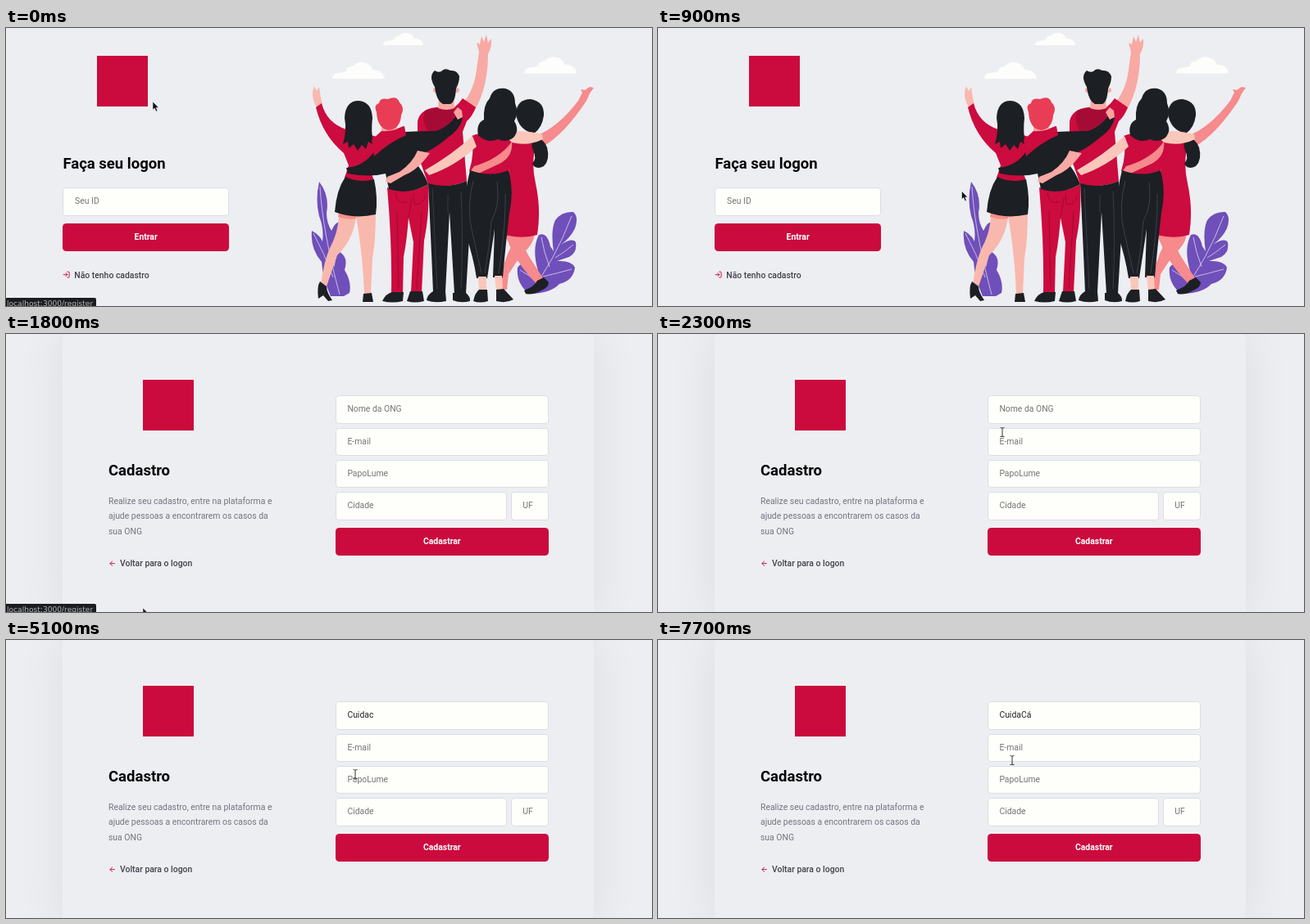
These frames come from a looping animation (788x340 px, 8000 ms). An HTML page:

```html
<!DOCTYPE html>
<html lang="pt-BR">
<head>
<meta charset="utf-8">
<title>Cadastro</title>
<style>
  html, body { margin: 0; width: 100%; height: 100%; overflow: hidden; }
  body { position: relative; background: #edeef2; font: 400 10.4px/1 Roboto, sans-serif; color: #737380; }
  .page, .page > *, #status, #pointer { position: absolute; box-sizing: border-box; white-space: nowrap; }
  .page { inset: 0; overflow: hidden; }
  .card { left: 69px; top: 0; width: 648px; height: 346px; border-radius: 4.6px; box-shadow: 0 0 58px rgba(0, 0, 0, .075); }
  .brand { width: 62px; height: 62px; background: #cb0b3d; }
  h1 { margin: 0; font-size: 18.5px; line-height: 20px; font-weight: 700; color: #060609; }
  .field, .button { height: 34.6px; border-radius: 4.6px; display: flex; align-items: center; }
  .field { padding-left: 13.7px; border: .6px solid #dcdce6; background: #fefefb; color: #757575; }
  .button { justify-content: center; background: #cb0b3d; color: #fff; font-weight: 700; }
  .link { line-height: 14px; font-weight: 500; color: #41414d; }
  .icon { width: 9.3px; height: 9.3px; fill: none; stroke: #cb0b3d; stroke-width: 2.4; stroke-linecap: round; stroke-linejoin: round; }
  .text { line-height: 18.5px; }
  .typed { color: #222; }
  .caret { position: relative; width: 0; height: 12px; }
  .caret::after { content: ""; position: absolute; left: -.2px; width: 1px; height: 12px; background: #222; }
  #status { left: 0; top: 330px; width: 110px; height: 10px; padding-left: 1px; overflow: hidden; border-radius: 0 2px 0 0;
    background: #1b1d20; color: #b6b7b9; font: 9.1px/14px "DejaVu Sans", sans-serif; }
  #art { left: 0; top: 0; }
  #pointer { left: 0; top: 0; overflow: visible; }
  [hidden] { display: none !important; }
</style>
</head>
<body>

<div class="page" id="login">
  <svg id="art" width="788" height="340" viewBox="0 0 788 340">
    <defs>
      <path id="cloud" d="M0 20Q0 13 8 13Q14 12 17 11Q18 4 25 5Q30-1 38 0Q48 2 49 9Q62 9 64 20Z"/>
    </defs>
    <g fill="#fdfdfb">
      <use href="#cloud" transform="translate(460 6) scale(.77 .75)"/>
      <use href="#cloud" x="398" y="42"/>
      <use href="#cloud" x="632" y="35.5"/>
    </g>

    <!-- plants -->
    <g fill="#6f4fb9">
      <path d="M382 188Q395 205 391 226Q391 238 397 248Q404 232 412 240Q414 254 407 274Q418 280 413 296Q422 311 419 324L412 328H396Q386 305 385 286Q371 270 373 248Q382 252 386 261Q388 245 382 230Q377 210 382 188Z"/>
      <path d="M638 325Q622 312 624 293Q632 282 643 293L649 297Q641 270 650 253Q660 249 664 267L668 273Q664 248 670 235Q678 224 692 225Q699 231 694 245Q689 256 677 265Q691 256 695 262Q697 275 687 280L672 285Q690 284 694 293Q692 309 675 313Q664 325 638 325Z"/>
    </g>
    <g fill="none" stroke="#ded8ef" stroke-width=".8">
      <path d="M383 194Q386 248 407 326M375 251Q388 275 399 305M410 242Q405 265 400 292"/>
      <path d="M640 322Q669 285 690 230M653 256Q656 274 663 292M692 265Q680 275 670 281M627 296L649 310M690 295Q672 300 655 304"/>
    </g>

    <!-- woman in the long dress -->
    <g fill="#f68a8c">
      <path d="M627 250L645 252Q643 265 632 274Q622 286 613 301L611 320H604L605 299Q611 271 627 250Z"/>
      <path d="M607 249L630 252Q631 270 639 281L657 309L650 316Q628 294 617 272Z"/>
      <path d="M646 132Q673 122 698 89L703 79L701 75L706 76L712 72L717 73L712 80L708 89Q681 130 655 145Z"/>
    </g>
    <path fill="#cc0b3e" d="M617 136Q638 126 647 140Q640 164 646 190Q653 222 648 253Q628 259 606 252Q606 220 612 190Z"/>
    <path fill="#1c1f24" d="M622 105Q623 87 640 87Q657 90 656 107Q654 122 644 129Q625 125 622 105Z"/>
    <path fill="#1c1f24" d="M645 133Q656 135 660 146Q664 161 656 169Q646 174 642 166Q648 159 643 150Q639 141 645 133Z"/>
    <path fill="#1c1f24" d="M632 321Q645 316 648 309L656 305L662 311Q662 317 653 321Q642 327 634 325Z"/>

    <!-- man with the raised arm -->
    <path fill="#f8a9a3" d="M555 95Q571 77 574 51L577 29L574 18L578 20L580 10L583 17L586 8L588 18L592 13Q593 23 588 32Q588 72 572 100L563 109Z"/>
    <path fill="#cc0b3e" d="M502 114Q505 99 525 97L547 97Q553 92 557 86L573 97Q569 108 562 114L557 127L562 187Q538 197 515 191L502 154Z"/>
    <path fill="#a60b36" d="M511 101L528 97Q537 101 547 97L546 114Q541 124 527 127H515Q507 115 511 101Z"/>
    <path fill="#f8a9a3" d="M528 84H546L547 98Q537 102 527 98Z"/>
    <g fill="#f8a9a3"><circle cx="524" cy="76" r="3"/><circle cx="550" cy="76" r="3"/></g>
    <path fill="#1c1f24" d="M523 72Q515 59 523 52Q527 55 531 53Q535 48 542 52Q550 51 553 59Q553 67 549 74Q548 91 542 93H533Q525 89 523 72Z"/>
    <path fill="#1c1f24" d="M515 190Q538 197 562 187L566 240L561 325H547L541 225L536 323H521Q518 250 515 190Z"/>
    <path fill="none" stroke="#3f444c" stroke-width=".8" d="M520 196Q523 259 526 319M539 204V226M555 200Q558 258 555 319"/>
    <path fill="#1c1f24" d="M513 333Q514 326 521 322L536 322L537 334Q523 337 513 333ZM545 333V324L560 323Q567 329 566 334Q555 337 545 333Z"/>

    <!-- woman in the skirt -->
    <path fill="#f9b8ad" d="M406 222H451Q451 262 447 281L445 325H437Q435 276 427 230Q424 259 404 278L391 316L384 313Q388 285 395 269Q407 247 406 222Z"/>
    <path fill="#f68f88" d="M406 226H428L427 233Q416 235 405 231Z"/>
    <path fill="#f9b9ae" d="M376 91Q372 81 376 71L379 77L382 72L384 85L386 96L380 99Z"/>
    <path fill="#cc0b3e" d="M378 97L385 92Q391 116 415 124Q431 126 452 133L485 120L488 130Q466 139 452 152L446 178L449 187Q430 190 413 183L418 168L412 153Q386 131 378 97Z"/>
    <path fill="#1c1f24" d="M414 182Q430 190 449 185Q454 208 451 228Q424 234 401 225Q403 198 414 182Z"/>
    <path fill="#1c1f24" d="M413 110Q414 89 430 89Q446 90 447 110Q445 126 448 143L442 139L439 148L434 143L429 150L424 142L418 147L417 139L411 142Q416 125 413 110Z"/>
    <path fill="#1c1f24" d="M381 331Q379 316 383 310L391 316Q391 323 398 333L393 334L387 327ZM435 335L436 325L446 324L448 335Z"/>

    <!-- red-haired man -->
    <path fill="#f8a39e" d="M458 111H476L477 124Q467 130 458 126Z"/>
    <path fill="#e93d55" d="M452 103Q448 94 455 92Q456 85 466 87Q477 82 480 91Q487 97 482 107Q481 123 467 125Q453 123 452 103Z"/>
    <path fill="#cc0b3e" d="M465 195Q492 205 515 191Q517 227 510 260L507 323H494L497 262L491 232Q489 260 485 280L484 324H470Q471 264 465 195Z"/>
    <path fill="#1c1f24" d="M449 151Q460 138 480 131L487 127Q505 126 525 126Q541 120 550 106L557 108Q556 122 539 134Q520 150 508 153L503 169Q511 180 515 191Q491 205 467 197L463 178Q443 183 417 178L415 171Q437 169 449 151Z"/>
    <path fill="#cc0b3e" d="M446 137L458 126Q473 127 486 120L488 131Q467 140 449 157Z"/>
    <path fill="#f8a39e" d="M546 103L551 97L556 101L557 109L551 112Z"/>
    <path fill="none" stroke="#930b30" stroke-width=".8" d="M475 202Q477 216 489 213M497 202L498 215Q507 219 512 205M477 224L479 319M507 224L501 319M491 232L495 208"/>
    <path fill="#1c1f24" d="M459 334Q463 325 471 323L485 323L484 334Q472 337 459 334ZM489 334L493 322L508 322L510 334Q498 337 489 334Z"/>
    <path fill="#f8a9a3" d="M502 150L517 153Q502 174 486 180L469 190L463 188L465 182L480 176Q496 165 502 150Z"/>

    <!-- woman with curls -->
    <path fill="#cc0b3e" d="M568 132Q585 125 611 131L622 139L613 176Q589 183 565 175Q572 153 568 132Z"/>
    <path fill="#fac7ba" d="M569 132L574 145Q548 169 516 180L511 174Q544 155 569 132Z"/>
    <path fill="#fac7ba" d="M604 127Q632 124 654 130L655 136Q637 145 617 140Z"/>
    <path fill="#f68a8c" d="M617 139Q619 157 602 166L574 179L566 176L571 169Q602 160 617 139Z"/>
    <path fill="#1c1f24" d="M576 131Q573 117 583 112Q582 94 590 86Q594 72 609 74Q621 77 621 92Q626 104 620 114Q627 125 619 134Q610 141 600 136Q587 142 576 131Z"/>
    <path fill="#1c1f24" d="M566 174Q591 183 613 174Q620 200 614 226Q609 270 606 305H594L596 246L587 306H574Q570 279 560 250Q557 209 566 174Z"/>
    <path fill="none" stroke="#444a52" stroke-width=".8" d="M570 187Q561 220 569 251L580 300M599 188Q603 218 592 236Q590 269 584 300M609 203Q610 238 601 300"/>
    <path fill="#fac7ba" d="M576 304H586L586 322H577ZM596 303H605L606 322H598Z"/>
    <path fill="#1c1f24" d="M570 334Q572 324 577 320L587 320L588 334Q578 337 570 334ZM598 334L598 320L607 319L619 332Q610 337 598 334Z"/>
  </svg>

  <div class="brand" style="left:111px; top:34px"></div>
  <h1 style="left:69.4px; top:156px">Faça seu logon</h1>
  <div class="field" style="left:69.4px; top:195px; width:202.5px">Seu ID</div>
  <div class="button" style="left:69.4px; top:238.8px; width:202.5px">Entrar</div>
  <svg class="icon" style="left:69.4px; top:297.2px" viewBox="0 0 24 24"><path d="M15 3h4a2 2 0 0 1 2 2v14a2 2 0 0 1-2 2h-4M10 17l5-5-5-5M15 12H3"/></svg>
  <div class="link" id="join" style="left:83.3px; top:295.5px">Não tenho cadastro</div>
</div>

<div class="page" id="register" hidden>
  <div class="card"></div>
  <div class="brand" style="left:167px; top:55.5px"></div>
  <h1 style="left:125px; top:157px">Cadastro</h1>
  <div class="text" style="left:125px; top:195.7px">Realize seu cadastro, entre na plataforma e<br>ajude pessoas a encontrarem os casos da<br>sua ONG</div>
  <svg class="icon" style="left:125px; top:275.5px" viewBox="0 0 24 24"><path d="M19 12H5M12 19l-7-7 7-7"/></svg>
  <div class="link" style="left:139px; top:273.5px">Voltar para o logon</div>
  <div class="field" style="left:401.7px; top:75.3px; width:260.3px"><span class="caret" id="nameCaret"></span><span id="name"></span><span class="caret" id="endCaret"></span></div>
  <div class="field" style="left:401.7px; top:114.6px; width:260.3px"><span class="caret" id="mailCaret"></span>E-mail</div>
  <div class="field" style="left:401.7px; top:153.8px; width:260.3px">PapoLume</div>
  <div class="field" style="left:401.7px; top:193px; width:209px">Cidade</div>
  <div class="field" style="left:615.6px; top:193px; width:46.4px">UF</div>
  <div class="button" style="left:401.7px; top:236.8px; width:260.3px">Cadastrar</div>
</div>

<div id="status">localhost:3000/register</div>

<svg id="pointer" width="10" height="14">
  <path id="arrow" d="M0 0V10L2.3 8L4 12L5.8 11.2L4.1 7.4H7.2Z" fill="#111" stroke="#fff" stroke-width=".5"/>
  <path id="beam" d="M-2.5-5.5Q0-5.5 0-4.5Q0-5.5 2.5-5.5M0-4.5V4.5M-2.5 5.5Q0 5.5 0 4.5Q0 5.5 2.5 5.5" fill="none" stroke="#444" stroke-width="1.1"/>
</svg>

<script>
  const LOOP = 8000, TICK = 100;
  const $ = id => document.getElementById(id);
  const show = (id, on) => { $(id).hidden = !on; $(id).style.display = on ? "" : "none"; };
  const within = (t, ...spans) => spans.some(([a, b]) => t >= a && t < b);

  // time, x, y
  const path = [
    [0, 179, 90], [300, 470, 44], [500, 683, 80], [700, 520, 190], [900, 370.5, 199.5],
    [1300, 140, 326], [1500, 113.5, 302], [1700, 113.5, 302], [1800, 167, 335],
    [2000, 290, 270], [2300, 420, 120], [2500, 430, 91], [2800, 426, 164],
    [6600, 426, 164], [6900, 452, 103], [7100, 441, 137], [7200, 441, 137],
    [7400, 432, 147], [LOOP, 432, 147]
  ];
  const typing = [
    [3700, "C"], [4000, "Cu"], [4100, "Cui"], [4200, "Cuid"], [4500, "Cuidac"],
    [5200, "Cuida"], [5700, "CuidaC"], [5900, "CuidaCá"]
  ];

  function locate(t) {
    const i = path.findIndex(p => p[0] > t);
    const [t0, x0, y0] = path[i - 1], [t1, x1, y1] = path[i];
    const k = (t - t0) / (t1 - t0);
    return [x0 + (x1 - x0) * k, y0 + (y1 - y0) * k];
  }

  function draw(t) {
    const second = t >= 1800;
    show("login", !second);
    show("register", second);
    show("status", within(t, [0, 400], [1700, 2300]));
    $("join").style.opacity = within(t, [1500, 1800]) ? .8 : 1;

    const [x, y] = locate(t);
    const overField = second && x > 402;
    $("pointer").style.transform = `translate(${x}px, ${y}px)`;
    show("arrow", !overField);
    show("beam", overField);

    const last = typing.filter(([at]) => at <= t).pop();
    $("name").textContent = last ? last[1] : "Nome da ONG";
    $("name").className = last ? "typed" : "";
    show("nameCaret", within(t, [2500, 3100]));
    show("endCaret", within(t, [3700, 5100], [5200, 6500]));
    show("mailCaret", within(t, [7100, 7700]));
  }

  const start = performance.now();
  function frame() {
    const t = (performance.now() - start) % LOOP;
    draw(Math.floor(t / TICK) * TICK);
    requestAnimationFrame(frame);
  }
  frame();
</script>
</body>
</html>
```
